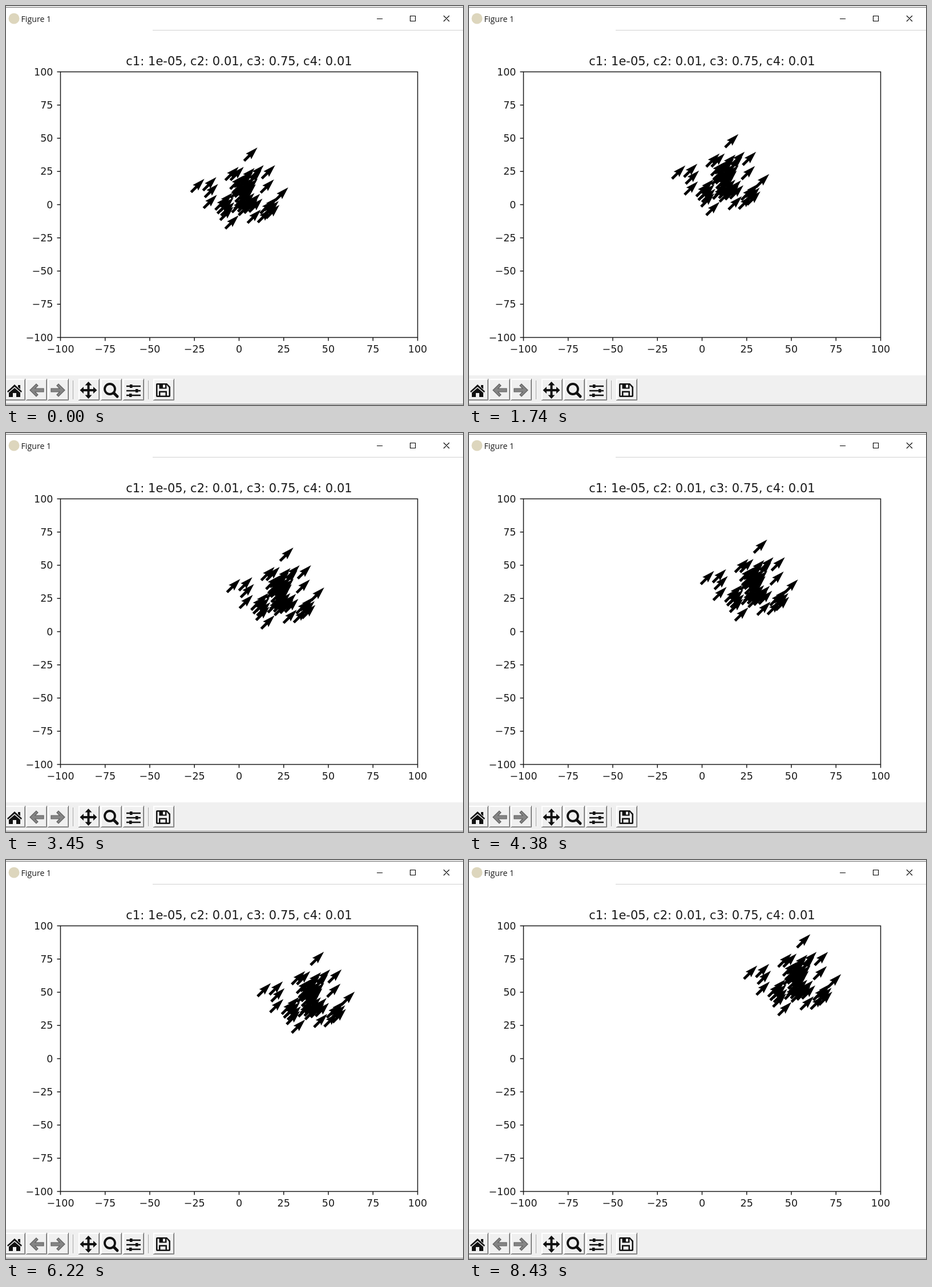
Recreate the animation shown at these times as an HTML page. Size 801 by 700 pixels, loop 8.51 s.

```html
<!DOCTYPE html>
<html>
<head>
<meta charset="utf-8">
<style>
html, body { margin: 0; width: 100%; height: 100%; overflow: hidden; background: #fff; }
svg { display: block; }
text { fill: #1a1a1a; }
.plot { font: 17.5px "DejaVu Sans", sans-serif; }
.title { font-size: 21.05px; text-anchor: middle; }
.line { fill: none; stroke: #1a1a1a; stroke-width: 1.5; }
.thin { fill: none; stroke: #000; stroke-width: 1.1; }
.icon { fill: #111; }
.off { fill: #858585; stroke: #606060; stroke-width: 1.2; }
</style>
</head>
<body>
<svg width="801" height="700" viewBox="0 0 801 700">
  <defs>
    <path id="arrow" transform="rotate(-45)" d="M1 0L-21 6.8L-19 2.4H-32V-2.4H-19L-21 -6.8Z"/>
    <g id="button">
      <path fill="#f0f0f0" d="M0 0h37v38H0z"/>
      <path fill="none" stroke="#fff" stroke-width="2" d="M1 37V1H36"/>
      <path fill="none" stroke="#a0a0a0" d="M2 36.5H35.5V2"/>
      <path fill="none" stroke="#696969" d="M0 37.5H36.5V0"/>
    </g>
    <path id="back" d="M-12 0L-1 -11L2 -8L-3 -3H12V3H-3L2 8L-1 11Z"/>
  </defs>

  <!-- window frame -->
  <path fill="#e9e9e9" d="M0 0h801v2H0z"/>
  <path fill="#777" d="M0 2h801v1H0z"/>
  <path fill="#d0d0d0" d="M257 42h544v1H257z"/>
  <circle cx="14" cy="22" r="9.5" fill="#ddd6bd"/>
  <text x="26.5" y="28" font-family="Open Sans, sans-serif" font-size="14.2">Figure 1</text>
  <path class="thin" d="M650 22.5h10M708.5 17.5h9v9h-9zM767 17l10 10M777 17l-10 10"/>

  <!-- plot -->
  <g class="plot">
    <text class="title" x="408.5" y="104">c1: 1e-05, c2: 0.01, c3: 0.75, c4: 0.01</text>
    <g id="ticks"></g>
  </g>
  <g id="flock"></g>
  <path class="line" d="M95.5 115.5h626v466h-626z"/>

  <!-- toolbar -->
  <path fill="#f0f0f0" d="M0 648h801v52H0z"/>
  <path fill="#777" d="M0 698h801v1H0z"/>
  <g id="buttons"></g>
  <path fill="#a8a8a8" d="M117 657h1v33h-1zM249 657h1v33h-1z"/>
  <path class="icon" d="M15 664L28 676L26.5 678L15 668L3.5 678L2 676L7 671.5ZM21 665h4v7l-4-3.5zM15 670L25 678.5V686H18V679H12V686H5V678.5Z"/>
  <use href="#back" class="off" transform="translate(54 674)"/>
  <use href="#back" class="off" transform="translate(91 674) scale(-1 1)"/>
  <path class="icon" d="M144.5 659l6 6.5h-4v6.5h6.5v-4l6.5 6-6.5 6v-4h-6.5v6.5h4l-6 6.5-6-6.5h4v-6.5h-6.5v4l-6.5-6 6.5-6v4h6.5v-6.5h-4z"/>
  <g fill="none" stroke="#111">
    <circle cx="182" cy="672" r="9" stroke-width="3.8"/>
    <path stroke-width="5" stroke-linecap="round" d="M189.5 679.5l5.5 5.5"/>
    <path stroke-width="2.6" d="M211 667h25M211 675h25M211 683h25"/>
    <path stroke-width="6" d="M217 667h4.5M227 675h4.5M216 683h4.5"/>
  </g>
  <path class="icon" fill-rule="evenodd" d="M265 662h17l6 6v16q0 2-2 2h-21q-2 0-2-2v-20q0-2 2-2zM265.5 664.5v19h2.5v-8h14v8h3.5v-14l-4-5v7h-13v-7zM275 664.5v5h4v-5zM270.5 678v5.5h9v-5.5z"/>
</svg>

<script>
const el = id => document.getElementById(id);
const LOOP = 8510, STEP = 167.5;

// Tips of the arrows on the rim of the flock
const rim = [
  [440, 249], [347, 304], [368, 301], [371, 313], [369, 332], [407, 283],
  [416, 283], [435, 285], [451, 280], [471, 280], [469, 305], [494, 319],
  [407, 368], [398, 353], [446, 358], [464, 357], [447, 289]
];

// Crowded areas inside it
const clumps = [
  { x: 427, y: 308, rx: 14, ry: 20, count: 14 },
  { x: 396, y: 337, rx: 7, ry: 12, count: 5 },
  { x: 434, y: 335, rx: 17, ry: 12, count: 10 },
  { x: 475, y: 343, rx: 7, ry: 10, count: 5 }
];

// Points spread evenly over an ellipse by the golden angle
const spread = ({ x, y, rx, ry, count }) => Array.from({ length: count }, (_, i) => {
  const r = Math.sqrt((i + 0.5) / count), a = i * 2.4;
  return [x + rx * r * Math.cos(a), y + ry * r * Math.sin(a)];
});

function drawTicks() {
  let out = "";
  for (let v = -100; v <= 100; v += 25) {
    const x = 408.5 + v * 3.13, y = 348.5 - v * 2.33;
    const label = String(v).replace("-", "\u2212");
    out += `<path class="line" d="M${x} 581.5v6M95.5 ${y}h-6"/>
      <text x="${x}" y="607.5" text-anchor="middle">${label}</text>
      <text x="82.5" y="${y + 6.2}" text-anchor="end">${label}</text>`;
  }
  el("ticks").innerHTML = out;
}

drawTicks();
el("flock").innerHTML = [...rim, ...clumps.flatMap(spread)]
  .map(([x, y]) => `<use href="#arrow" transform="translate(${x} ${y})"/>`).join("");
el("buttons").innerHTML = [-3, 35, 73, 127, 166, 205, 258]
  .map(x => `<use href="#button" x="${x}" y="654"/>`).join("");

// The whole flock jumps by the same amount at every step
function frame() {
  const n = Math.floor(performance.now() % LOOP / STEP);
  el("flock").setAttribute("transform", `translate(${n * 3.15} ${n * -2.36})`);
  requestAnimationFrame(frame);
}
frame();
</script>
</body>
</html>
```
